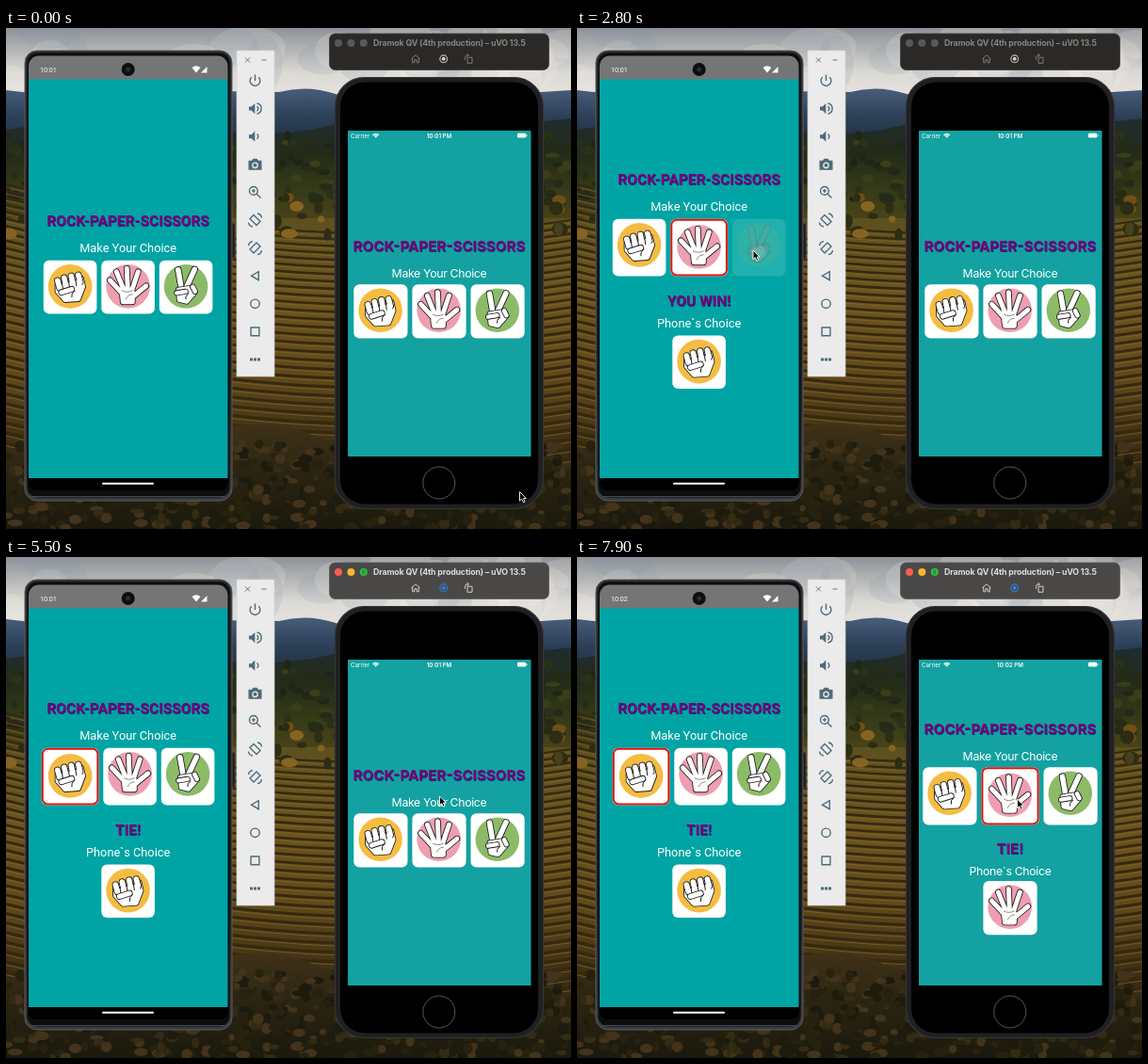
An HTML page with a canvas for the animation above (8000 ms loop, 600 by 532 pixels).

```html
<!DOCTYPE html>
<html lang="en">
<head>
<meta charset="utf-8">
<title>Rock paper scissors</title>
<style>
html, body { margin: 0; width: 100%; height: 100%; overflow: hidden; background: #000; }
canvas { display: block; }
</style>
</head>
<body>
<canvas id="stage" width="600" height="532"></canvas>
<script>
const LOOP = 8000;
const stage = document.getElementById('stage').getContext('2d');
const ROBOTO = 'Roboto, sans-serif', INTER = 'Inter, sans-serif';
let g = stage;

// Drawing helpers
function box(x, y, w, h, r, fill, line, width = 1) {
  g.beginPath();
  g.roundRect(x, y, w, h, r);
  if (fill) { g.fillStyle = fill; g.fill(); }
  if (line) { g.strokeStyle = line; g.lineWidth = width; g.stroke(); }
}
function disc(x, y, r, fill, line, width = 1) { box(x - r, y - r, 2 * r, 2 * r, r, fill, line, width); }
function fade(y0, y1, ...colors) {
  const f = g.createLinearGradient(0, y0, 0, y1);
  colors.forEach((c, i) => f.addColorStop(i / (colors.length - 1), c));
  return f;
}
function shape(d, fill, line, width = 1) {
  const p = new Path2D(d);
  if (fill) { g.fillStyle = fill; g.fill(p); }
  if (line) { g.strokeStyle = line; g.lineWidth = width; g.stroke(p); }
}
function at(x, y, draw) {
  g.save();
  g.translate(x, y);
  draw();
  g.restore();
}
function label(s, x, y, font, color, align = 'center', spacing = 0) {
  g.font = font;
  g.fillStyle = color;
  g.textAlign = align;
  g.letterSpacing = spacing + 'px';
  g.fillText(s, x, y);
}

// Wallpaper: sky, mountains, woods, vineyard rows, trees
let seed = 7;
const rnd = () => (seed = seed * 16807 % 2147483647) / 2147483647;
function blobs(count, y, h, size, colors) {
  for (let i = 0; i < count; i++) {
    g.beginPath();
    g.ellipse(rnd() * 600, y + rnd() * h, size * (.6 + rnd()), size * (.5 + rnd() * .7), 0, 0, 7);
    g.fillStyle = colors[i % colors.length];
    g.fill();
  }
}
function wallpaper() {
  box(0, 0, 600, 110, 0, fade(0, 72, '#8d9299', '#b4b5b5', '#dcdad5', '#e6e2dc'));
  g.globalAlpha = .18;
  blobs(30, 5, 55, 26, ['#f2eee6', '#f2eee6', '#8794a4']);
  g.globalAlpha = 1;
  shape('M0 66Q60 74 130 70T290 68Q320 60 350 70T600 66V180H0Z', fade(62, 125, '#4a607d', '#2c4059', '#202f3b'));
  shape('M0 108Q90 92 190 106T350 102Q460 112 600 96V260H0Z', fade(98, 205, '#202c2d', '#232b18', '#343a17', '#4b4319'));
  blobs(260, 112, 80, 5, ['#1d2618', '#2a3119', '#3b3d18', '#252b16']);
  box(0, 202, 600, 330, 0, fade(202, 450, '#5c501e', '#6b541f', '#62491b', '#3a2c13'));
  for (let i = 0; i < 34; i++) {
    const y = 196 + i * 7 + i * i * .06;
    shape(`M0 ${y - 30}Q330 ${y + 50} 600 ${y + 8}`, null, '#35290f', 2.2 + i * .04);
    shape(`M0 ${y - 27}Q330 ${y + 53} 600 ${y + 11}`, null, '#84672b', .7);
  }
  blobs(130, 178, 42, 6, ['#2c2d14', '#6f4f17', '#47401a', '#866321']);
  shape('M0 448Q70 430 160 460Q250 400 320 430T470 468Q540 450 600 470V532H0Z', fade(410, 532, '#45351a', '#2b2412', '#1b190d'));
  blobs(500, 440, 92, 5, ['#26220f', '#332b13', '#42331a', '#1c1b0d']);
}

// Hands, drawn in a 57 by 57 square
const INK = '#1c1a1a';
function ink(d, width) {
  g.lineCap = g.lineJoin = 'round';
  shape(d, null, INK, width + 1.7);
  shape(d, '#fff', '#fff', width);
}
const hands = [
  () => {
    disc(28.3, 27.6, 23.3, '#f5bc42');
    ink('M15 25L40 19L42 28L37 41L23 42L15 33Z', 4.5);
    ['M15 21.5L17 29', 'M22 18.5L24 27', 'M29.5 16.5L31 25', 'M37 15.5L39 23'].forEach(d => ink(d, 5.6));
    shape('M17 26L40 20L41 29L36 40L23 41L17 34Z', '#fff');
    ink('M19 34L30 30.5', 5);
    shape('M19.6 24L20.6 30M26.6 22L27.6 28M34 20L35 27M33 32Q29 35 30 39', null, INK, 1);
  },
  () => {
    disc(28.3, 27.6, 23.3, '#ee9eb0');
    ink('M22 35L9 21M24 32L16 12M28 31L27 8.5M32 33L39 12M33 39L47.5 27M22 34L33 34L33 44L23 44Z', 5);
    shape('M22 32Q27 35 33 32M26 41Q28 36 33 36', null, '#555', .7);
  },
  () => {
    disc(28.3, 27.6, 23.3, '#8cbb68');
    ink('M23.5 30L20 10', 5.6);
    ink('M29 28L37.5 9.5', 5.6);
    ink('M20 31L33 29L37 35L29 44L21 42Z', 4);
    ink('M35.5 28L38 33', 4.6);
    shape('M22 31L31 29.5L34 35L28 42L22 40Z', '#fff');
    ink('M18.5 34.5L28 33', 4.4);
    shape('M31 35Q27 38 28 41', null, INK, 1);
  }
];
function card(x, y, w, h, hand, chosen, alpha = 1) {
  g.save();
  g.globalAlpha = alpha;
  box(x, y, w, h, 6, '#fff');
  const inset = chosen ? 2 : 0;
  at(x + inset, y + inset, hands[hand]);
  if (chosen) box(x + 1, y + 1, w - 2, h - 2, 5.5, null, '#e3120b', 2);
  g.restore();
}

// Game screens
const droid = {
  cx: 129.6, top: 205, rise: 44, size: 56.6, resultY: 290, cardY: 326.5, rowGap: 41.8,
  bold: '700 15.5px ' + ROBOTO, plain: '12.8px ' + ROBOTO, spacing: 0,
  plays: [[1150, 0, 'TIE!', 0], [2050, 1, 'YOU WIN!', 0], [2850, 2, 'YOU WIN!', 1], [3700, 1, 'YOU WIN!', 0], [4550, 0, 'TIE!', 0]]
};
const slab = {
  cx: 460, top: 232, rise: 49, size: 57.2, resultY: 309.5, cardY: 344, rowGap: 40.2,
  bold: '700 15.2px ' + INTER, plain: '12.3px ' + INTER, spacing: -.33,
  plays: [[6000, 1, 'TIE!', 1]]
};
function heading(s, p, y) {
  g.save();
  g.shadowColor = 'rgba(20,0,110,.7)';
  g.shadowOffsetX = g.shadowOffsetY = .6;
  label(s, p.cx, y + 5.4, p.bold, '#780078');
  g.restore();
}
// A card dims while it is held down and recovers after release
function dim(p, t, i) {
  const press = p.plays.find(q => q[1] === i && t >= q[0] - 150 && t < q[0] + 250);
  return press ? .13 + .87 * Math.max(0, t - press[0]) / 250 : 1;
}
function game(p, t) {
  const play = p.plays.filter(q => q[0] <= t).pop();
  const y = p.top - (play ? p.rise : 0), gap = 4.9, grow = play ? 4 : 0;
  heading('ROCK-PAPER-SCISSORS', p, y);
  label('Make Your Choice', p.cx, y + 33.2, p.plain, '#fff', 'center', p.spacing);
  let x = p.cx - (3 * p.size + 2 * gap + grow) / 2;
  for (let i = 0; i < 3; i++) {
    const chosen = play && play[1] === i, w = p.size + (chosen ? 4 : 0);
    card(x, y + p.rowGap, w, p.size + grow, i, chosen, dim(p, t, i));
    x += w + gap;
  }
  if (!play) return;
  heading(play[2], p, p.resultY);
  label('Phone`s Choice', p.cx, p.resultY + 28, p.plain, '#fff', 'center', p.spacing);
  card(p.cx - p.size / 2, p.cardY, p.size, p.size, play[3]);
}

// Devices and toolbars
const TOOL = '#4f6b79';
const speaker = 'M-6.5 -2h2.7l3.6 -3.6v11.2l-3.6 -3.6h-2.7z';
const tools = [
  ['M-3.8 -3.8A5.4 5.4 0 1 0 3.8 -3.8M0 -6.5V0'],
  ['M2 -2.5a2.9 2.9 0 0 1 0 5M2 -5.6a5.7 5.7 0 0 1 0 11.2', speaker],
  ['M2 -2.5a2.9 2.9 0 0 1 0 5', speaker],
  ['', 'M-7 -4h3.5l1.5 -2h4l1.5 2h3.5v10h-14z'],
  ['M-6 -1.5a4.4 4.4 0 1 0 8.8 0a4.4 4.4 0 1 0 -8.8 0M2 2L6 6M-3.6 -1.5h4M-1.6 -3.5v4'],
  ['M-1.5 -5.5L5.5 1.5L1.5 5.5L-5.5 -1.5ZM-7 2.5Q-6.5 6.5 -2.5 7M7 -2.5Q6.5 -6.5 2.5 -7'],
  ['M1.5 -5.5L-5.5 1.5L-1.5 5.5L5.5 -1.5ZM7 2.5Q6.5 6.5 2.5 7M-7 -2.5Q-6.5 -6.5 -2.5 -7'],
  ['M3.8 -4.5V4.5L-4 0Z'],
  ['M-4.7 0a4.7 4.7 0 1 0 9.4 0a4.7 4.7 0 1 0 -9.4 0'],
  ['M-4.4 -4.4h8.8v8.8h-8.8z'],
  ['', 'M-5.5 -1.5h3v3h-3zM-1.5 -1.5h3v3h-3zM2.5 -1.5h3v3h-3z']
];
function hardware() {
  // Left phone
  box(238, 207, 5, 38, 2, '#17181b', '#4a4b4e', .7);
  box(20, 24, 220, 478, 13, fade(24, 502, '#2b2c2f', '#1d1e21', '#1d1e21', '#3a3b41'), '#5c5d61', 1);
  box(22.5, 26.5, 215, 472, 11, '#0c0d0f');
  box(24, 29.5, 211.5, 25.5, [11, 11, 0, 0], '#757575');
  box(24, 54.5, 211.5, 423.5, 0, '#00a4a4');
  box(24, 478, 211.5, 13, [0, 0, 8, 8], '#000');
  shape('M26 497.5H234', null, '#46474c', 1);
  box(102, 482.7, 55, 2, 1, '#fff');
  disc(129.7, 44, 7, '#0d0e10');
  disc(129.7, 44, 2.5, '#26303b');
  shape('M197.5 42Q202 38.4 206.5 42L202 47.5Z', '#fff');
  shape('M207 47.5L213.5 41V47.5Z', '#fff');
  // Side toolbar
  box(245, 24, 40, 346, 0, '#ebebeb', '#d2d2d2', .7);
  shape('M254 31.5l5 5M259 31.5l-5 5M271.5 34h5', null, '#69747a', 1);
  tools.forEach(([line, fill], i) => at(264.5, 56 + i * 29.6, () => {
    shape(line, null, TOOL, 1.4);
    if (fill) shape(fill, TOOL);
    if (i === 3) disc(0, 1, 2.7, TOOL, '#ebebeb', 1.3);
  }));
  // Right phone
  box(347.8, 117, 4, 25, 1, '#252527');
  box(568, 117, 4, 30, 1, '#252527');
  box(349.5, 52.5, 221, 458, 31, '#202022', '#353537', 1.2);
  box(355, 57.5, 210, 448, 26, '#000');
  box(363, 109, 194.5, 346, 0, '#13a1a1');
  disc(459.8, 483, 17, '#000', '#585858', 1);
  g.lineCap = 'butt';
  [1.2, 2.9, 4.6].forEach(r => {
    g.beginPath();
    g.arc(392.7, 117, r, -2.35, -.79);
    g.strokeStyle = '#fff';
    g.lineWidth = 1.2;
    g.stroke();
  });
  box(543, 111.8, 9.2, 4.7, 1.3, '#fff');
  box(552.6, 113.2, .9, 2, .4, '#fff');
  label('Carrier', 366, 116.6, '6.2px ' + INTER, '#fff', 'left');
}
function windowBar(active) {
  box(343.5, 6, 233, 38.5, 6, active ? '#4a4846' : '#2b2927', active ? '#5b5957' : '#3b3937', .8);
  const lights = active ? ['#fb5b52', '#f6b72f', '#35bd45'] : Array(3).fill('#5a5856');
  lights.forEach((c, i) => disc(353 + i * 13.4, 16, 4, c));
  if (active) shape('M378.8 13.5v5M380.8 13.5v5', null, '#176f24', .8);
  label('Dramok QV (4th production) – uVO 13.5', 390, 19.2, '700 8.8px ' + INTER, active ? '#dedcda' : '#858381', 'left', -.16);
  const tone = active ? '#d0cecc' : '#7d7b79';
  at(435, 32.8, () => shape('M-4.5 0L0 -4L4.5 0M-3.3 -1V4H-1.2V1H1.2V4H3.3V-1', null, tone, 1));
  disc(464.7, 32.8, 3.9, null, active ? '#2f7de0' : '#bdbbb9', 1.1);
  disc(464.7, 32.8, 2, active ? '#2f7de0' : '#d0cecc');
  at(491.5, 32.8, () => shape('M-1.5 -1.5h5v6h-5zM-4 1V-1.5Q-4 -4 -1 -4M-2 -5.5L0 -4L-2 -2.5', null, tone, 1));
}

// Pointer: time, x, y; it rests on each card around the press
const trail = [
  [0, 545.5, 492.5], [200, 545.5, 492.5], [750, 64.5, 278], [1400, 64.5, 278], [1850, 119.5, 233], [2200, 119.5, 233],
  [2550, 187, 236], [3000, 187, 236], [3400, 123.5, 236], [3850, 123.5, 236], [4250, 66, 232], [4800, 66, 232],
  [5400, 460.5, 254], [6400, 460.5, 254], [7000, 467.5, 257], [LOOP, 467.5, 257]
];
function pointer(t) {
  const i = trail.findIndex(k => k[0] > t), [t0, x0, y0] = trail[i - 1], [t1, x1, y1] = trail[i];
  const u = (t - t0) / (t1 - t0), e = u * u * (3 - 2 * u);
  at(x0 + (x1 - x0) * e, y0 + (y1 - y0) * e, () =>
    shape('M0 0V9.6L2.2 7.6L3.8 11.2L5.5 10.4L4 7H6.9Z', '#000', '#fff', .9));
}

// Everything that never changes is painted once
const still = document.createElement('canvas');
still.width = 600;
still.height = 532;
g = still.getContext('2d');
wallpaper();
hardware();
g = stage;

function frame(now) {
  const t = Math.floor(now % LOOP / 100) * 100;
  const clock = t < 7000 ? '10:01' : '10:02';
  g.drawImage(still, 0, 0);
  label(clock, 36, 46.7, '7.2px ' + ROBOTO, '#fff', 'left');
  label(clock + ' PM', 460, 116.6, '600 6.2px ' + INTER, '#fff');
  windowBar(t >= 5500);
  game(droid, t);
  game(slab, t);
  pointer(t);
  requestAnimationFrame(frame);
}
requestAnimationFrame(frame);
</script>
</body>
</html>
```
